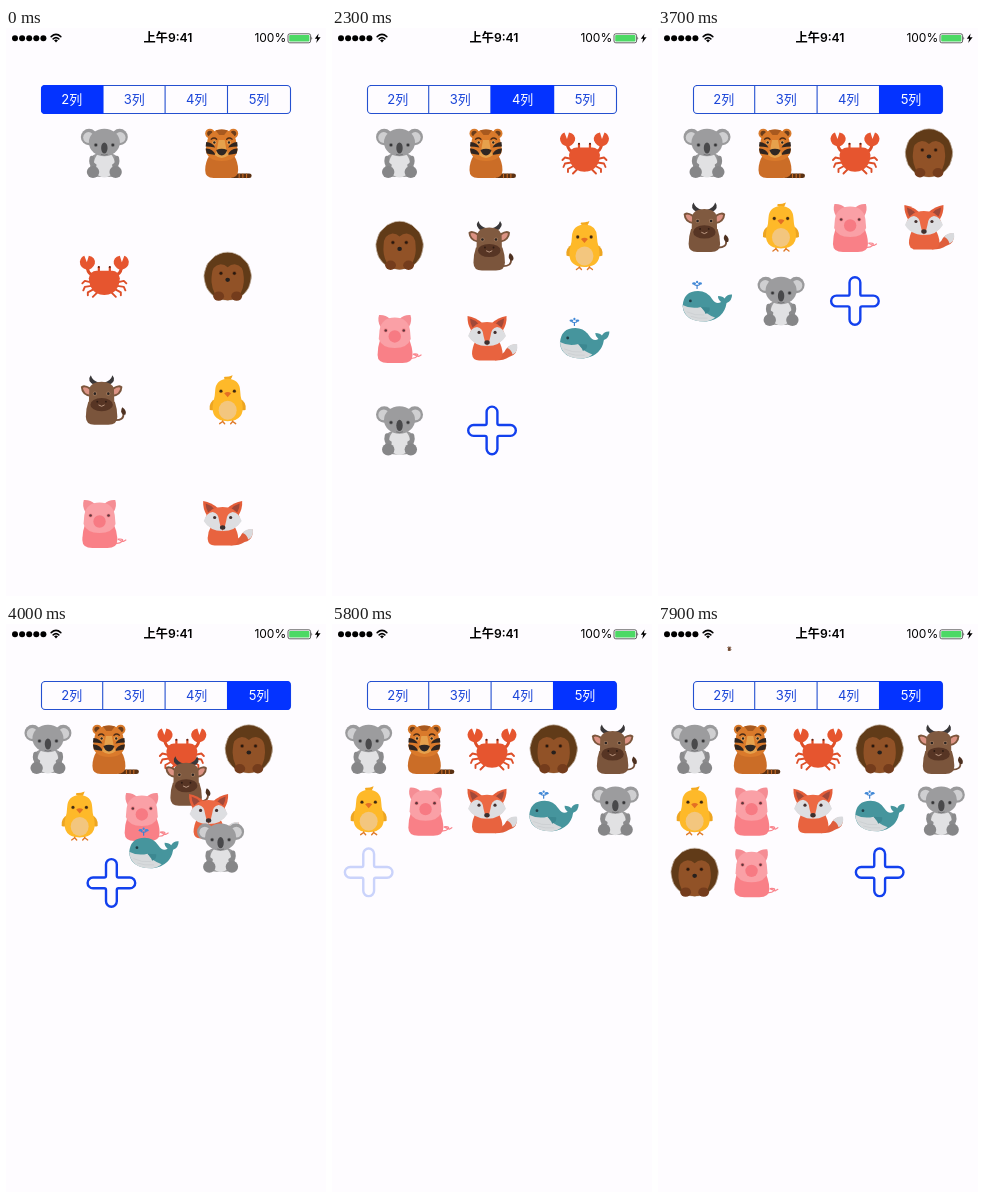
An HTML page that plays this animation: 320x568 px, repeating every 8 s.

```html
<!DOCTYPE html>
<html lang="zh-Hans">
<head>
<meta charset="utf-8">
<title>Animal grid</title>
<style>
html, body { margin: 0; width: 100%; height: 100%; overflow: hidden; background: #fefcff; }
svg { display: block; width: 320px; height: 568px; }
text { font-family: Inter, "Noto Sans CJK SC", "Noto Sans CJK", sans-serif; text-anchor: middle; }
</style>
</head>
<body>
<svg id="stage" viewBox="0 0 320 568"></svg>
<script>
const stage = document.getElementById('stage');
const ell = (x, y, rx, ry, fill) => `<ellipse cx="${x}" cy="${y}" rx="${rx}" ry="${ry}" fill="${fill}"/>`;
const dot = (x, y, r, fill) => ell(x, y, r, r, fill);
const path = (d, fill) => `<path d="${d}" fill="${fill}"/>`;
const line = (d, color, width) =>
  `<path d="${d}" fill="none" stroke="${color}" stroke-width="${width}" stroke-linecap="round" stroke-linejoin="round"/>`;
const pair = (x1, x2, y, r, fill) => dot(x1, y, r, fill) + dot(x2, y, r, fill);
// The same shapes plus their reflection about a vertical axis
const mirror = (axis, shapes) => shapes + `<g transform="translate(${2 * axis}) scale(-1 1)">${shapes}</g>`;

const art = {
  koala: mirror(25,
      dot(9.7, 9, 8.2, '#9a9a9c') + dot(9.2, 9.5, 5.4, '#cfcfd1')) +
    path('M12 31Q12 25 25 25Q38 25 38 31L40 44Q40 49 25 49Q10 49 10 44Z', '#98989a') +
    ell(25, 36.5, 10.5, 13, '#e1e1e3') +
    mirror(25, line('M12.5 30Q11 36 15 37.5', '#8b8b8d', 4.5) + ell(13.7, 44, 6.2, 6, '#868688')) +
    ell(25, 14.5, 15.5, 13.7, '#9c9c9e') +
    pair(16.5, 33.5, 17, 2, '#777779') + pair(16.5, 33.5, 17, 1.3, '#363638') +
    ell(25, 20, 3.2, 5.6, '#49494b') + line('M22 26.5Q25 28 28 26.5', '#6d6d6f', .8),

  tiger: path('M32 45.5H46.5Q49 45.5 49 47.7Q49 50 46.5 50H28Z', '#5a3012') +
    line('M36.5 46V49.6M40.2 46V49.6M43.9 46V49.6', '#c96d27', 1.1) +
    path('M7 27H31Q35.5 34 35.5 42Q35.5 50 27 50H11Q2.5 50 2.5 42Q2.5 34 7 27Z', '#cb6d27') +
    mirror(19, dot(7.3, 5.5, 4.8, '#d97a2b') + dot(7.3, 5.5, 2.8, '#6b3d1b')) +
    path('M5 11Q8 1.5 19 1.5Q30 1.5 33 11L35 22Q33 33 19 33Q5 33 3 22Z', '#da7a2b') +
    path('M13 2.5Q19 .5 25 2.5L21.5 7H16.5Z', '#a8591f') +
    mirror(19, path('M3.5 14Q10 14.5 12.5 19.5Q7 18.5 3 18.5ZM3 20.5Q10 20 13 27Q7.5 26 4 25.5Z', '#30251f') +
      line('M8.5 11.2Q11.5 8.7 14 11.2', '#4a2a15', 1.3) +
      dot(11.7, 14.5, 1.9, '#efb469') + dot(11.7, 14.5, 1.2, '#2a211c')) +
    path('M16 12H22L24 23L26 27Q19 33 12 27L14 23Z', '#e6a14c') +
    path('M13.5 22Q19 19.5 24.5 22Q23 27 19 27.5Q15 27 13.5 22Z', '#2f2723'),

  crab: mirror(25,
      line('M12 31L5.5 29.5L3 32M12 34.5L5.5 35.5L4 39M14 38L8.5 41L8.5 44M18 41L13.5 45.5', '#dd4e28', 1.9) +
      line('M14 24Q9 23 8 17', '#dd4e28', 3) +
      path('M9.5 4.5Q16.5 6 15.5 12.5Q13 18.5 7.5 18.5Q.5 16.5 .5 10.5Q1.5 5.5 5 4.5L7.5 11Z', '#e6552f') +
      line('M19.5 21V16', '#dd4e28', 2.2)) +
    path('M9.5 27Q11 19.5 17 19.5H33Q39 19.5 40.5 27Q40 37 33.5 41.5Q25 46 16.5 41.5Q10 37 9.5 27Z', '#e6552f') +
    pair(19.5, 30.5, 15.7, 1, '#5b2315'),

  hedgehog: `<path d="M25 .8Q30 .8 33 2.5Q38 4 41 8Q46 12 47 17Q50 24 48 30Q47 37 42 42Q37 48 25 49Q13 48 8 42Q3 37 2 30Q0 24 3 17Q4 12 9 8Q12 4 17 2.5Q20 .8 25 .8Z" fill="#613b18" stroke="#cbbcae" stroke-width=".7"/>` +
    path('M9 25Q9 14 18 13Q22 13 25 16Q28 13 32 13Q41 14 41 25Q42 34 38 42Q33 49 25 49Q17 49 12 42Q8 34 9 25Z', '#915227') +
    mirror(25, dot(18.3, 22, 2, '#6f3b1a') + dot(18.3, 22, 1.3, '#27180f') +
      ell(16, 44.8, 5.4, 4.7, '#743c1c')) +
    ell(25, 28.5, 2.3, 2.1, '#26201d'),

  bull: line('M35 45.5Q45 46 44 39', '#75503a', 1.8) + path('M44 40Q40 37 43 32.5Q48 36 46 40Z', '#4d3020') +
    path('M9 27H35.5Q38 34 38 42Q38 50 29 50H15Q6.5 50 6.5 42Q6.5 34 9 27Z', '#7b553c') +
    mirror(22.3,
      path('M15 10.5Q7 6 11.5 .5Q13 6 20 8Z', '#393739') +
      path('M11.5 13Q4 8.5 1.5 12Q2 20.5 11 22Z', '#7b553c') + path('M10.5 15Q6 11.5 3.5 13Q4.5 19 10.5 20Z', '#dc9384')) +
    path('M10 14Q12 7 22.3 7Q32.5 7 34.6 14L35 29Q32 35 22.3 35Q12.5 35 9.5 29Z', '#805a40') +
    pair(15.5, 29, 19, 2.1, '#a27b5e') + pair(15.5, 29, 19, 1.3, '#292220') +
    ell(22.3, 30, 11.3, 6.6, '#573524') + pair(18, 26.6, 27, .9, '#2f1b13') +
    line('M19.5 30.5Q22.3 33 25 30.5', '#c9a58f', .9),

  chick: mirror(25, line('M20 44V47.2M17 49L20 46.8L22 49', '#df7928', 1.4)) +
    path('M27 6Q19 4 22 2Q25 2.5 30 .5Q29 4 27 6Z', '#f4a91f') +
    mirror(25, path('M13 24Q6 27 7 35Q11 37 15 33Z', '#eda521')) +
    path('M12.5 16Q13 4.5 25 4Q37 4.5 37.5 16Q37.5 21 39.5 28Q43 46 25 46.5Q7 46 10.5 28Q12.5 21 12.5 16Z', '#feb929') +
    ell(25, 35.5, 9, 9.5, '#f3c67e') +
    pair(18.3, 31.7, 16.5, 1.9, '#d08b19') + pair(18.3, 31.7, 16.5, 1.4, '#3c2a16') +
    path('M21.5 18.5Q25 16 28.5 18.5L25 22.5Z', '#e36f24'),

  pig: line('M35 45Q40 46 42.5 43.5T40.5 41T44 43.5L46.5 42', '#f9858d', 1.2) +
    path('M6 25H34Q38 34 38 42Q38 50 28 50H13Q3 50 3 42Q3 34 6 25Z', '#f98087') +
    mirror(20.2, path('M4.5 2Q11 1.5 15.5 6L6 14Q2.5 8 4.5 2Z', '#f58d94')) +
    path('M5 17Q7 4.5 20.2 4.5Q33.4 4.5 35.4 17L36.2 26Q33 35 20.2 35Q7.4 35 4.2 26Z', '#faa0a6') +
    pair(11.2, 29.2, 17.5, 2.1, '#f1838a') + pair(11.2, 29.2, 17.5, 1.3, '#60363b') +
    dot(20.2, 23.5, 6.2, '#f77a83'),

  fox: path('M28 42Q36 43 39 36Q43 31 50 31.5Q51 42 42 44Q37 47.5 28 47.5Z', '#df5e3c') +
    path('M40 35Q43 30.5 50 31Q51.5 39 45.5 41.5Q44 36 40 35Z', '#d9dadd') +
    path('M9 27H31Q35.5 34 35.5 41Q35 47.5 28 47.5H12Q5.5 47.5 5 41Q5 34 9 27Z', '#e8633f') +
    mirror(20, path('M.5 3Q9 4.5 15 10L4.5 18Q0 11 .5 3Z', '#e45d39') + path('M3 5.5Q8 7 11 10.5L5.5 14.5Q3 10 3 5.5Z', '#a0493a')) +
    path('M3.5 18Q9 9 20 9Q31 9 36.5 18L38 23Q33 32 20 34Q7 32 2 23Z', '#ec6944') +
    mirror(20, path('M1 23Q4 14.5 10 14Q16 15 16.5 23Q17.5 29 20 33Q7 33 1 23Z', '#dddee1') +
      dot(12, 19.5, 1.6, '#44302e')) +
    ell(20, 29.5, 2.7, 2.2, '#3b302f'),

  whale: line('M15 12.5V9.5M14.5 9.5Q12.5 9.5 12.5 8.3M15.5 9.5Q17.5 9.5 17.5 8.3', '#3d82d1', 1.2) +
    mirror(15, ell(12, 7.6, 1.9, 1.2, '#4289d7')) + ell(15, 6, 1.1, 1.2, '#4289d7') +
    path('M.5 30Q1.5 15 16 15Q25 15 30 23Q34 29 39 26Q35.5 23 36 20Q41 20 42.5 22.5Q45 18 50 18.5Q50 25 44.5 27Q42 43 24 45.5Q2 46 .5 30Z', '#46959d') +
    path('M.5 29Q9 33.5 19 31Q23 38 33 41.5Q29 45 23 45.5Q2 46 .5 29Z', '#d7dadc') +
    line('M5 36Q13 40 22 39M9 40.5Q16 43 25 42.2', '#c6cacd', .6) +
    path('M18.5 31Q22 33 23.5 38Q28.5 36 27.5 31.5Z', '#3c8891') +
    dot(8.3, 25, 1.4, '#213f48'),

  plus: `<path d="M19.6 6.6A5.4 5.4 0 0 1 30.4 6.6V17.9Q30.4 19.6 32.1 19.6H43.4A5.4 5.4 0 0 1 43.4 30.4H32.1Q30.4 30.4 30.4 32.1V43.4A5.4 5.4 0 0 1 19.6 43.4V32.1Q19.6 30.4 17.9 30.4H6.6A5.4 5.4 0 0 1 6.6 19.6H17.9Q19.6 19.6 19.6 17.9Z" fill="none" stroke="#1240ee" stroke-width="2.4"/>`
};

const base = ['koala', 'tiger', 'crab', 'hedgehog', 'bull', 'chick', 'pig', 'fox', 'whale', 'koala'];
const added = ['hedgehog', 'pig', 'bull'];
const drops = [5850, 6925, 7840];           // when each new animal takes off
const relayouts = [[1000, 3], [2300, 4], [3700, 5]];
const PRESS = 235, DROP = 600, SLIDE = 910, LOOP = 8000;
const blue = '#0433ff', edge = '#2450d0';

const statusBar = [9, 16.1, 23.2, 30.3, 37.4].map(x => dot(x, 10.3, 3, '#000')).join('') +
  line('M45.2 8.6Q50 4.2 54.8 8.6M47.2 10.9Q50 8.3 52.8 10.9', '#000', 1.6) + path('M48 12.2Q50 10.6 52 12.2L50 14.4Z', '#000') +
  `<text x="162" y="14.4" font-size="12.2" font-weight="600">上午9:41</text>
   <text x="264.3" y="14.4" font-size="12">100%</text>
   <rect x="282" y="5.8" width="22.6" height="9" rx="1.8" fill="none" stroke="#222" stroke-width=".7"/>
   <rect x="283.2" y="7" width="20.2" height="6.6" rx=".8" fill="#4cd964"/>` +
  path('M305.5 8.5Q307 10.3 305.5 12Z', '#222') + path('M312.6 5.5L308.8 10.8H311.2L310.2 15L314.6 9.3H311.9Z', '#000');

const segX = n => 35 + 62.4 * (n - 2);
const control = `<clipPath id="round"><rect x="35" y="57" width="250" height="29" rx="4"/></clipPath>` +
  [3, 4, 5].map(n => line(`M${segX(n) - .7} 58V85`, edge, 1.1)).join('') +
  `<rect x="35.5" y="57.5" width="249" height="28" rx="3.6" fill="none" stroke="${edge}" stroke-width="1.1"/>
   <g clip-path="url(#round)"><rect id="chosen" y="57" width="63.6" height="29" fill="${blue}"/></g>` +
  [2, 3, 4, 5].map(n => `<text class="label" x="${segX(n) + 30.8}" y="76.2" font-size="13">${n}列</text>`).join('');

stage.innerHTML = '<defs>' + Object.keys(art).map(k => `<g id="${k}">${art[k]}</g>`).join('') + '</defs>' +
  statusBar + control +
  [...base, ...added, 'plus'].map(k => `<use class="item" href="#${k}"/>`).join('');

const items = [...stage.querySelectorAll('.item')];
const plus = items.pop();
const labels = [...stage.querySelectorAll('.label')];
const chosen = document.getElementById('chosen');

// cubic-bezier(.25, .1, .25, 1)
function ease(t) {
  if (t <= 0) return 0;
  if (t >= 1) return 1;
  let lo = 0, hi = 1;
  for (let i = 0; i < 24; i++) {
    const s = (lo + hi) / 2;
    if (.75 * s * (1 - s) + s ** 3 < t) lo = s; else hi = s;
  }
  return .3 * lo * (1 - lo) ** 2 + 3 * lo * lo * (1 - lo) + lo ** 3;
}

function slot(i, cols) {
  const gap = (320 - 50 * cols) / (cols + 1);
  return [gap + (i % cols) * (50 + gap), 100 + Math.floor(i / cols) * (50 + gap)];
}

function place(el, x, y, scale = 1) {
  el.setAttribute('transform', `translate(${x} ${y}) scale(${scale})`);
}

function draw(t) {
  let from = 2, cols = 2, p = 1;
  for (const [start, n] of relayouts) {
    if (t >= start) [from, cols, p] = [cols, n, ease((t - start) / SLIDE)];
  }
  const at = i => {
    const a = slot(i, from), b = slot(i, cols);
    return [a[0] + (b[0] - a[0]) * p, a[1] + (b[1] - a[1]) * p];
  };

  chosen.setAttribute('x', segX(cols) - 1.2);
  labels.forEach((el, i) => el.setAttribute('fill', i + 2 === cols ? '#fff' : '#1a45d8'));

  items.forEach((el, i) => {
    const [x, y] = at(i);
    // New animals grow about their centre while flying in from the upper left
    const grow = i < base.length ? 1 : ease((t - drops[i - base.length]) / DROP);
    place(el, x - 73 * (1 - grow), y - 223 * (1 - grow), grow);
  });

  place(plus, ...at(base.length + drops.filter(d => t >= d).length));
  plus.setAttribute('opacity', drops.some(d => t >= d - PRESS && t < d) ? .22 : 1);
}

function tick() {
  draw(performance.now() % LOOP);
  requestAnimationFrame(tick);
}
tick();
</script>
</body>
</html>
```
